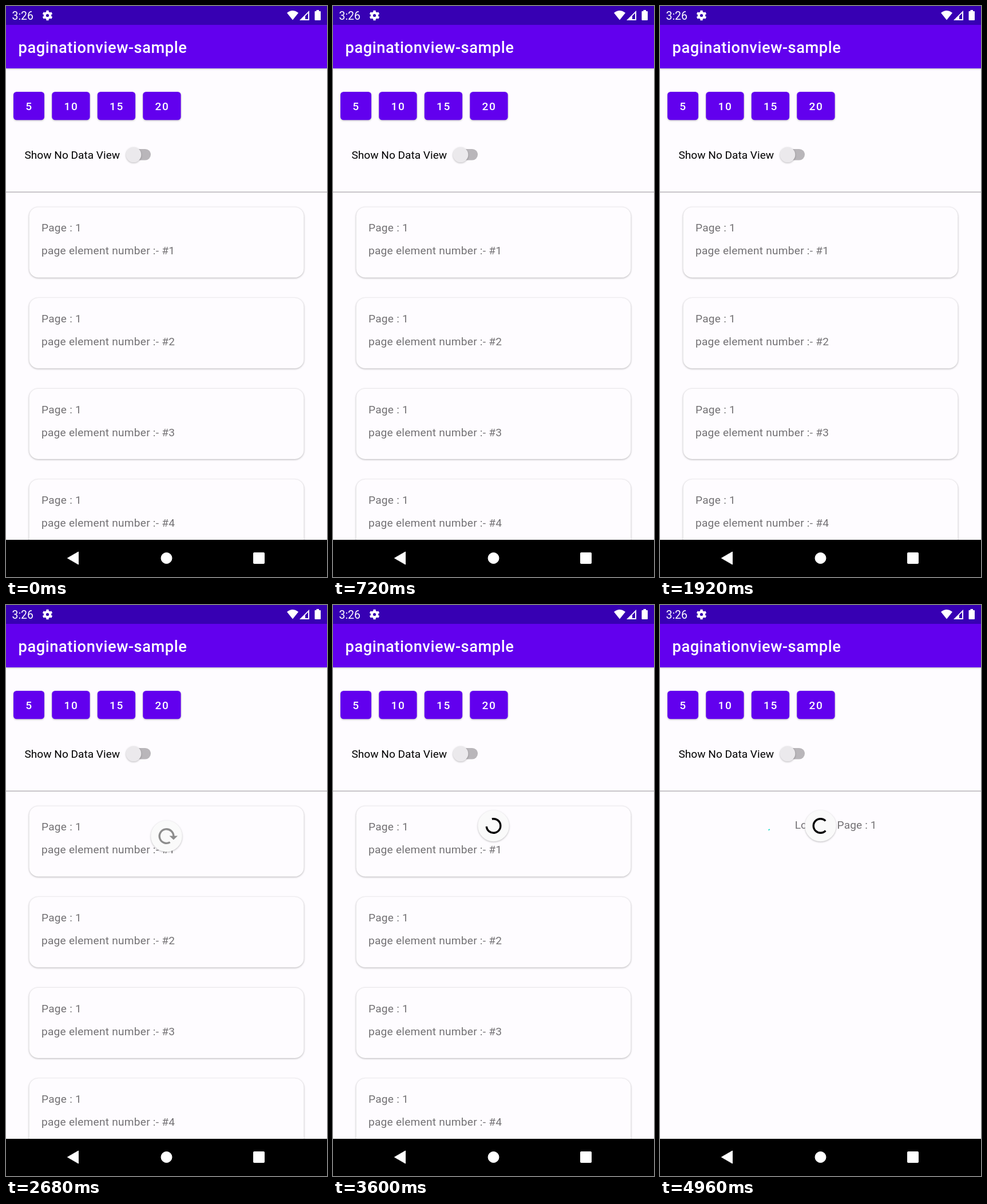
An HTML page that plays this animation: 561 px wide and 998 px high, repeating every 5.04 s.

```html
<!DOCTYPE html>
<html lang="en">
<head>
<meta charset="utf-8">
<title>Pagination sample</title>
<style>
  html, body { margin: 0; width: 100%; height: 100%; overflow: hidden; background: #fefcff; }
  svg { display: block; font: 19.1px Roboto, sans-serif; }
  .medium { font-weight: 500; fill: #fff; }
  .shadow { filter: drop-shadow(0 1.5px 1.5px #0004); }
  .grey { fill: #737174; letter-spacing: .25px; }
</style>
</head>
<body>
<svg width="561" height="998" viewBox="0 0 561 998">
  <defs><clipPath id="listArea"><path d="M0 326H561V933H0Z"/></clipPath></defs>
  <rect width="561" height="998" fill="#fefcff"/>

  <rect class="shadow" y="33" width="561" height="76" fill="#6200ee"/>
  <rect width="561" height="33" fill="#3700b3"/>
  <text x="10.5" y="24" fill="#fff" font-size="19.4">3:26</text>
  <g transform="translate(72.5 16.5)">
    <circle r="4.7" fill="none" stroke="#fff" stroke-width="4.2"/>
    <g id="teeth" stroke="#fff" stroke-width="4.2"></g>
  </g>
  <g fill="#fff">
    <path d="M491 12Q501 4 511 12L501 24.5Z"/>
    <path d="M513 25L530 8V25ZM523 17.5V23H528V12.5Z" fill-rule="evenodd"/>
    <path d="M542.5 9V7H547V9H549Q550 9 550 10V24Q550 25 549 25H540.5Q539.5 25 539.5 24V10Q539.5 9 540.5 9Z"/>
  </g>
  <text class="medium" x="21.5" y="81.5" font-size="27.3" letter-spacing=".55">paginationview-sample</text>

  <g id="buttons" class="medium" text-anchor="middle" letter-spacing="1.7"></g>
  <text x="32.5" y="266.5">Show No Data View</text>
  <rect x="212" y="250" width="41" height="19.5" rx="9.7" fill="#b9b6ba"/>
  <circle class="shadow" cx="223" cy="260" r="13.3" fill="#ebe9ec"/>
  <rect y="324.5" width="561" height="1.5" fill="#b7b4b8"/>

  <g clip-path="url(#listArea)">
    <g id="cards" class="grey"></g>
    <g id="loading">
      <text class="grey" x="235.7" y="391" style="letter-spacing:.12px">Loading Page : 1</text>
      <path id="greenArc" fill="none" stroke="#03dac5" stroke-width="2.7"/>
    </g>
    <g id="disk">
      <circle class="shadow" r="27.3" fill="#fafafa"/>
      <g id="ring">
        <path id="blackArc" fill="none" stroke="#000" stroke-width="3.4"/>
        <path id="arrow" d="M5 -.5H19.5L12.3 6.5Z"/>
      </g>
    </g>
  </g>

  <rect y="933" width="561" height="65"/>
  <g fill="#fff" stroke="#fff" stroke-linejoin="round">
    <path d="M107.5 965L126.5 954V976Z"/>
    <circle cx="280.5" cy="965" r="9.5"/>
    <rect x="432.5" y="955.5" width="19" height="19" rx="1"/>
  </g>
</svg>
<script>
const LOOP = 5040, REFRESH = 3600;
const $ = id => document.getElementById(id);
const clamp = v => Math.min(1, Math.max(0, v));
const ease = v => { v = clamp(v); return v * v * (3 - 2 * v); };

$('teeth').innerHTML = [0, 60, 120].map(a =>
  `<path d="M0 -8.8V-5M0 5V8.8" transform="rotate(${a})"/>`).join('');

$('buttons').innerHTML = [[5, 13, 54], [10, 80.3, 66.3], [15, 159.8, 66.3], [20, 239.3, 66.3]].map(([n, x, w]) =>
  `<rect class="shadow" x="${x}" y="150" width="${w}" height="49.3" rx="5.5" fill="#6200ee"/>
   <text x="${x + w / 2 + .5}" y="182">${n}</text>`).join('');

$('cards').innerHTML = [0, 1, 2, 3].map(i =>
  `<g transform="translate(0 ${351.3 + i * 158.6})">
    <rect class="shadow" x="40.3" width="480.4" height="123.5" rx="16" fill="#fefcff" stroke="#0000000c"/>
    <text x="62" y="43">Page : 1</text>
    <text x="62" y="83">page element number :- #${i + 1}</text>
  </g>`).join('');

// Pull-down positions: [time, centre y]
const pull = [[0, 295], [2400, 310], [2480, 322], [2680, 404], [2880, 433],
  [3040, 452], [3160, 462], [3280, 466], [REFRESH, 386]];

// The screen refreshes after 80, 200 and 320 ms in turn
function snap(t) {
  const d = Math.max(0, t - REFRESH), rest = d % 320;
  return REFRESH + d - rest + (rest >= 200 ? 200 : rest >= 80 ? 80 : 0);
}

function arc(cx, cy, r, from, to) {
  const point = a => `${cx + r * Math.cos(a * Math.PI / 180)} ${cy + r * Math.sin(a * Math.PI / 180)}`;
  return `M${point(from)}A${r} ${r} 0 ${to - from > 180 ? 1 : 0} 1 ${point(to)}`;
}

function draw(now) {
  const t = now % LOOP, s = snap(t), y = pull.findLast(p => p[0] <= t)[1];
  const spinning = t >= REFRESH;
  $('disk').setAttribute('transform', `translate(280.5 ${y})`);
  $('arrow').style.display = spinning ? 'none' : '';

  let head, tail;
  if (spinning) {
    const turn = .162 * (s - REFRESH), u = (s - 3550) / 666;
    head = 175 + turn + 280 * ease(u - 1);
    tail = -104 + turn + 280 * (ease(u) + ease(u - 2)) - 3;
    $('ring').removeAttribute('transform');
    $('ring').setAttribute('opacity', 1);
  } else {
    head = 0;
    tail = -300 * clamp((y - 300) / 100);
    $('ring').setAttribute('transform', `rotate(${(y - 404) * 2.5})`);
    $('ring').setAttribute('opacity', y < 404 ? .3 : y === 404 ? .43 : 1);
  }
  $('blackArc').setAttribute('d', arc(0, 0, 12.3, tail, head));

  $('cards').setAttribute('opacity', 1 - clamp((s - 3640) / 120));
  $('loading').setAttribute('opacity', clamp((s - 3760) / 120));
  const u = (s - 3627) / 1333, base = -78 + 306 * u;
  $('greenArc').setAttribute('d', arc(199, 384, 12, base + 270 * ease(2 * u - 1) - 8, base + 270 * ease(2 * u)));
}

const start = performance.now();
(function frame() {
  draw(performance.now() - start);
  requestAnimationFrame(frame);
})();
</script>
</body>
</html>
```
